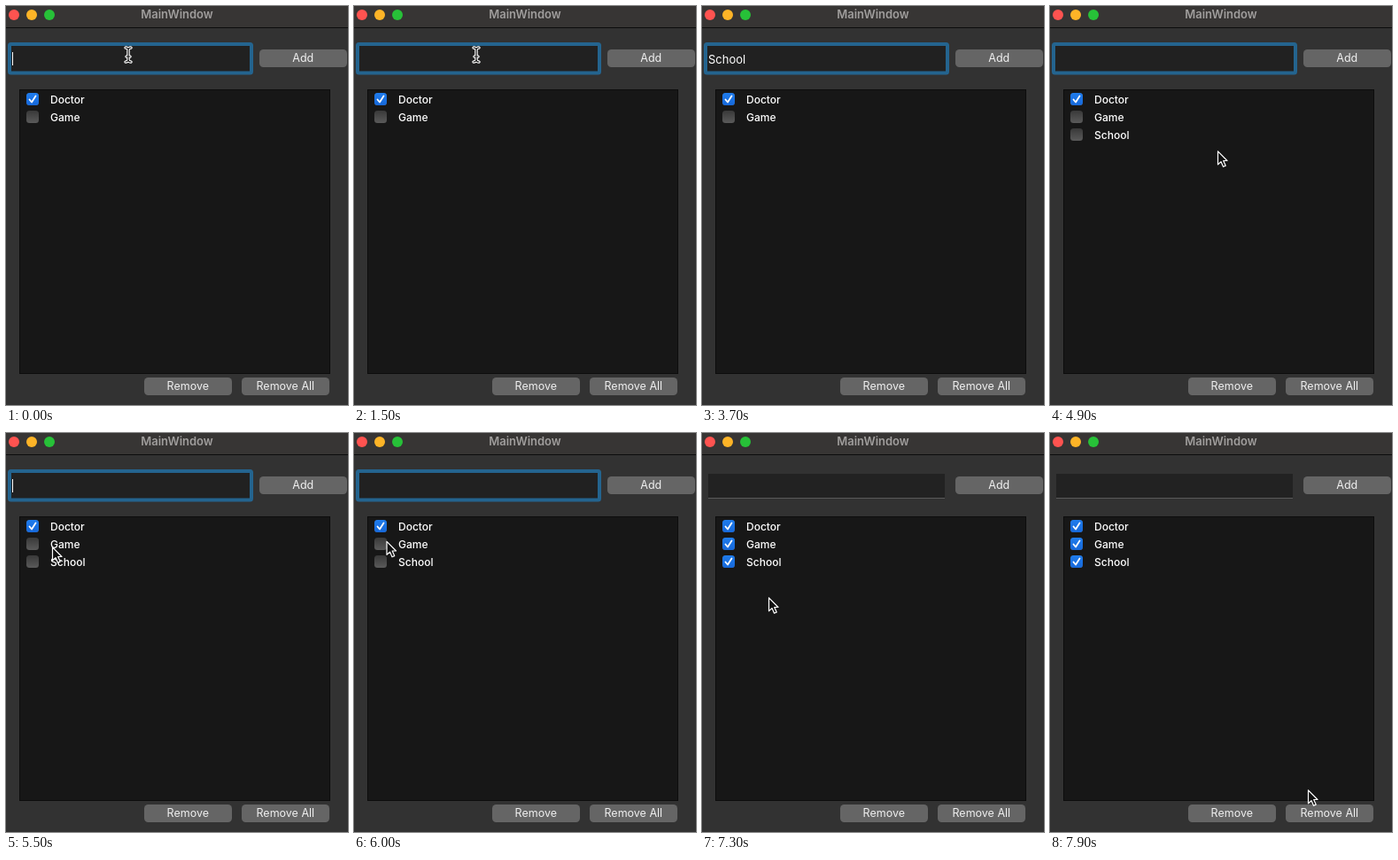
Write an HTML page that moves like this. It is 386 by 450 pixels and loops after 8 s.

```html
<!DOCTYPE html>
<html lang="en">
<head>
<meta charset="utf-8">
<title>MainWindow</title>
<style>
  html, body { margin: 0; width: 100%; height: 100%; overflow: hidden; background: #323232; }
  svg { display: block; }
  text { font-family: Inter, Roboto, sans-serif; fill: #fff; white-space: pre; }
  .button text { font-size: 12.5px; text-anchor: middle; fill: #efefef; }
  .item text { font-size: 12px; font-weight: 500; }
</style>
</head>
<body>
<svg id="stage" width="386" height="450" viewBox="0 0 386 450">
  <defs>
    <linearGradient id="off" x2="0" y2="1">
      <stop stop-color="#393939"/><stop offset="1" stop-color="#5a5a5a"/>
    </linearGradient>
    <linearGradient id="on" x2="0" y2="1">
      <stop stop-color="#1f7cec"/><stop offset="1" stop-color="#1668da"/>
    </linearGradient>
  </defs>

  <rect width="386" height="450" fill="#323232"/>
  <rect width="386" height="24" fill="#373534"/>
  <rect y="24" width="386" height="1" fill="#0c0c0c"/>
  <circle cx="9" cy="10" r="6" fill="#ff5350"/>
  <circle cx="29" cy="10" r="6" fill="#fdb427"/>
  <circle cx="49" cy="10" r="6" fill="#27c138"/>
  <text x="193" y="14" text-anchor="middle" font-size="13" font-weight="600" style="fill:#a09e9d">MainWindow</text>

  <rect x="7" y="46" width="267" height="27" fill="#222"/>
  <rect x="7" y="73" width="267" height="1" fill="#5a5a5a"/>
  <rect id="ring" x="4" y="43" width="273" height="32.5" rx="1.5" fill="#212121" stroke="#24648f" stroke-width="4"/>
  <text id="typed" x="7" y="65" font-size="13"></text>
  <rect id="caret" y="52" width="1" height="15" fill="#fff"/>

  <rect x="15.5" y="94.5" width="350" height="320" fill="#171717" stroke="#0d0d0d"/>
  <g id="items"></g>
  <g id="buttons"></g>

  <g id="beam" transform="translate(138 55)" fill="none" stroke-linecap="round">
    <path id="beamShape" d="M-3-8Q0-8 0-5.5Q0-8 3-8M0-6V6M-3 8Q0 8 0 5.5Q0 8 3 8M-2 2H2" stroke="#fff" stroke-width="3"/>
    <use href="#beamShape"/>
    <path d="M-3-8Q0-8 0-5.5Q0-8 3-8M0-6V6M-3 8Q0 8 0 5.5Q0 8 3 8M-2 2H2" stroke="#111" stroke-width="1.2"/>
  </g>
  <path id="arrow" d="M.5.8V15.8L4 12.6 6.5 18.3 9.2 17.1 6.7 11.5H11Z" fill="#111" stroke="#fff" stroke-width="1.2" stroke-linejoin="round"/>
</svg>

<script>
const $ = id => document.getElementById(id);
const show = (el, on) => el.setAttribute('visibility', on ? 'visible' : 'hidden');

const LOOP = 8000, STEP = 100;
const WORD = 'School';
const keyTimes = [1600, 1900, 2100, 2300, 2500, 3200];
const enterTime = 4000, blurTime = 6200;
// The caret turns on and off alternately at these times
const caretTimes = [0, 500, 1000, 1500, 1600, 3100, 3200, 3700, 4100, 4600, 5100, 5600, 6100, 6200];
// Label, time added, time checked
const items = [['Doctor', 0, 0], ['Game', 0, 6400], [WORD, enterTime, 7000]];
// Pointer positions: time, x, y
const path = [
  [4700, 158, 98], [4800, 180, 146], [4900, 189, 163], [5000, 186, 161], [5200, 125, 146],
  [5400, 62, 130], [5500, 52, 128], [5800, 40, 122], [6200, 33, 121], [6300, 33, 121],
  [6400, 29, 127], [6700, 29, 139], [7200, 29, 139], [7300, 75, 185], [7400, 200, 290],
  [7500, 269, 337], [7600, 269, 337], [7700, 279, 365], [7800, 288, 392], [7900, 291, 402]
];

$('items').innerHTML = items.map(([label], i) => `
  <g class="item" transform="translate(0 ${i * 20})">
    <rect x="23" y="98" width="14" height="14" rx="3.5" fill="url(#off)"/>
    <g class="check">
      <rect x="23" y="98" width="14" height="14" rx="3.5" fill="url(#on)"/>
      <path d="M26.5 105.5L29 108.5 33.5 101.5" fill="none" stroke="#fff" stroke-width="1.8" stroke-linecap="round" stroke-linejoin="round"/>
    </g>
    <text x="50" y="110">${label}</text>
  </g>`).join('');

$('buttons').innerHTML = [['Add', 286, 49], ['Remove', 156, 419], ['Remove All', 266, 419]].map(([label, x, y]) => `
  <g class="button" transform="translate(${x} ${y})">
    <rect width="99" height="20" rx="4.5" fill="#656565"/>
    <text x="49.3" y="14">${label}</text>
  </g>`).join('');

const rows = [...document.querySelectorAll('.item')];
const checks = [...document.querySelectorAll('.check')];
const passed = (times, t) => times.filter(k => t >= k).length;

function pointer(t) {
  const i = path.findIndex(p => p[0] > t);
  if (i < 0) return path[path.length - 1].slice(1);
  const [t0, x0, y0] = path[i - 1], [t1, x1, y1] = path[i];
  const u = (t - t0) / (t1 - t0);
  return [x0 + (x1 - x0) * u, y0 + (y1 - y0) * u];
}

function draw(t) {
  const typed = $('typed');
  typed.textContent = t < enterTime ? WORD.slice(0, passed(keyTimes, t)) : '';
  $('caret').setAttribute('x', 7 + Math.round(typed.getComputedTextLength()));
  show($('caret'), passed(caretTimes, t) % 2);
  show($('ring'), t < blurTime);

  items.forEach(([, added, checked], i) => {
    show(rows[i], t >= added);
    show(checks[i], t >= checked);
  });

  show($('beam'), t < keyTimes[0]);
  const moving = t >= path[0][0];
  show($('arrow'), moving);
  if (moving) $('arrow').setAttribute('transform', `translate(${pointer(t)})`);
}

const start = performance.now();
function tick() {
  const t = (performance.now() - start) % LOOP;
  draw(Math.floor(t / STEP) * STEP);
  requestAnimationFrame(tick);
}
tick();
</script>
</body>
</html>
```
